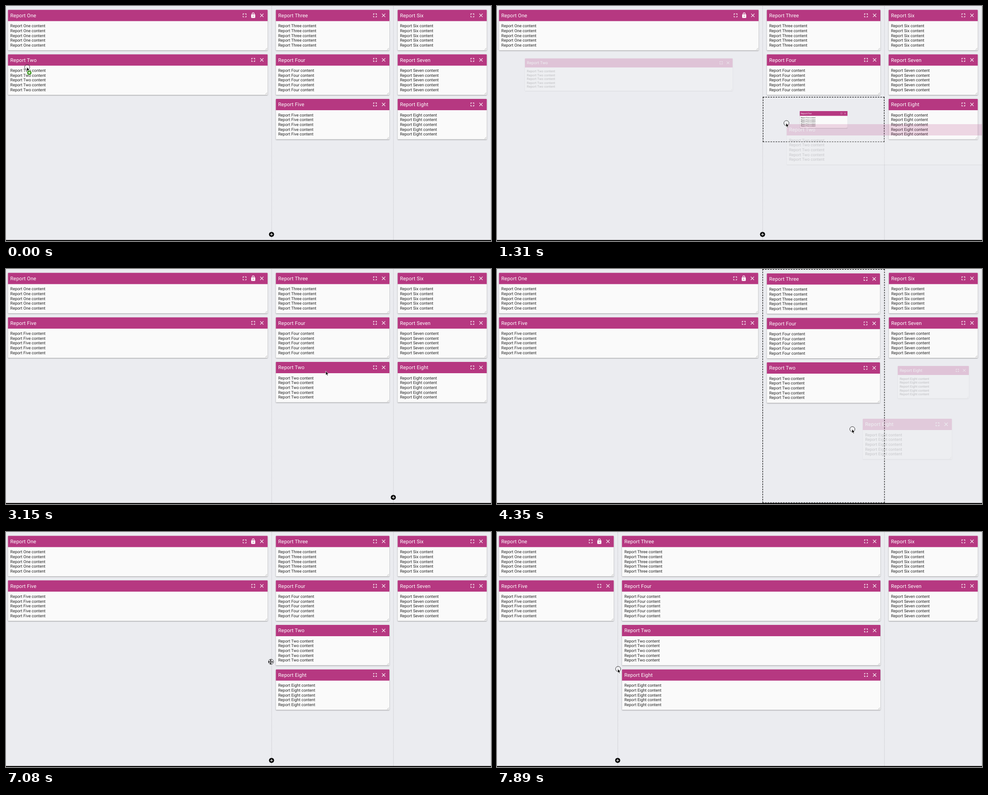
These frames come from a looping animation (1074 px wide and 521 px high, 8000 ms). An HTML page:

```html
<!DOCTYPE html>
<html lang="en">
<head>
<meta charset="utf-8">
<title>Report dashboard</title>
<style>
  html, body { margin: 0; width: 100%; height: 100%; overflow: hidden; background: #ebecf0; }
  svg { display: block; width: 1074px; height: 521px; font-family: Roboto, sans-serif; }
  text { white-space: pre; text-rendering: geometricPrecision; }
  .body { fill: #fafafa; filter: drop-shadow(0 1px 1px rgba(0, 0, 0, .36)); }
  .head { fill: #b63881; }
  .title { font-size: 11.2px; letter-spacing: .14px; fill: #fff; }
  .line { font-size: 9px; fill: #212121; }
  .icon { fill: none; stroke: #fff; stroke-width: 1.15; }
  .grip { stroke: #8a8a8a; stroke-width: .6; }
  .split { stroke: #bbbcc0; stroke-width: .8; }
  .drop { stroke: #000; stroke-width: 1.15; }
  .ring { fill: rgba(255, 255, 255, .25); stroke: #222; stroke-width: .9; }
  .arrow { stroke: #fff; stroke-width: .8; }
</style>
</head>
<body>
<svg id="stage" viewBox="0 0 1074 521"></svg>
<script>
const LOOP = 8000, TICK = 150, TOP = 8.6, CARD_H = 89.6, PITCH = 98.7;
const START = [46, 136];
const stage = document.getElementById('stage');

// Pointer moves: start time, end time, destination
const MOVES = [
  [0, 720, 455, 345], [720, 1310, 640, 260], [1310, 1570, 628, 231],
  [2850, 3150, 708, 227], [3150, 4050, 900, 213],
  [4050, 4350, 786, 355.5], [4350, 4830, 643, 355.5],
  [5900, 6640, 586, 288], [7230, 7890, 267.3, 304]
];

const within = (t, from, to) => t >= from && t < to;
const repeat = (n, draw) => Array.from({ length: n }, (_, i) => draw(i)).join('');
const spin = shape => repeat(4, i => `<g transform="rotate(${i * 90})">${shape}</g>`);

// The pointer advances in visible ticks along straight moves.
function pointerAt(t) {
  let [x, y] = START;
  for (const [from, to, toX, toY] of MOVES) {
    if (t < from) break;
    const k = t >= to ? 1 : Math.floor((t - from) / TICK) * TICK / (to - from);
    x += (toX - x) * k;
    y += (toY - y) * k;
  }
  return [x, y];
}

const ICONS = {
  close: '<path d="M-3.6-3.6L3.6 3.6M-3.6 3.6L3.6-3.6"/>',
  full: spin('<path d="M-3.4-1.1V-3.4H-1.1"/>'),
  lock: `<rect x="-4.5" y="-2.3" width="9" height="7.9" rx="1.1" fill="#fff" stroke="none"/>
    <path d="M-2.3-2V-3.4a2.3 2.3 0 0 1 4.6 0V-2"/><circle class="head" cy="1.7" r="1.1" stroke="none"/>`
};

function card(name, x, y, w, { scale = 1, alpha = 1 } = {}) {
  const icons = name === 'One' ? ['close', 'lock', 'full'] : ['close', 'full'];
  const dx = x + w * (1 - scale) / 2, dy = y + CARD_H * (1 - scale) / 2;
  return `<g transform="translate(${dx} ${dy}) scale(${scale})" opacity="${alpha}">
    <rect class="body" width="${w}" height="${CARD_H}" rx="1.2"/>
    <path class="head" d="M0 24.9V1.2Q0 0 1.2 0H${w - 1.2}Q${w} 0 ${w} 1.2V24.9z"/>
    <text class="title" x="5.2" y="16.4">Report ${name}</text>
    ${repeat(5, i => `<text class="line" x="5.2" y="${38.7 + i * 10.67}">Report ${name} content</text>`)}
    ${repeat(icons.length, i =>
      `<g class="icon" transform="translate(${w - 12.8 - i * 19.1} 12.2)">${ICONS[icons[i]]}</g>`)}
    <path class="grip" d="M${w - 5} ${CARD_H - 1}l4-4M${w - 2.5} ${CARD_H - 1}l1.5-1.5"/></g>`;
}

// Dashes are fitted so that every line begins and ends with a full one.
function dashed(kind, x1, y1, x2, y2, dash) {
  const length = Math.hypot(x2 - x1, y2 - y1);
  const count = Math.round((length + dash * 2 / 3) / (dash * 5 / 3));
  const gap = (length - count * dash) / (count - 1);
  return `<path class="${kind}" d="M${x1} ${y1}L${x2} ${y2}" stroke-dasharray="${dash} ${gap}"/>`;
}

function dropBox(x1, y1, x2, y2) {
  const side = (...ends) => dashed('drop', ...ends, 3.4), half = .56;
  return side(x1, y1 + half, x2, y1 + half) + side(x1, y2 - half, x2, y2 - half) +
    side(x1 + half, y1, x1 + half, y2) + side(x2 - half, y1, x2 - half, y2);
}

function cursor(t, x, y) {
  const pressed = t < 2590 || within(t, 4050, 5130) || t >= 7080;
  let shape = '<path class="arrow" d="M0-.6V8.4L2 6.6 3.5 9.8 5 9.1 3.6 6H6.3z"/>';
  if (within(t, 5280, 6050))
    shape = '<path d="M-2.5-4.5Q0-4.5 0-3Q0-4.5 2.5-4.5M0-3V3M-2.5 4.5Q0 4.5 0 3Q0 4.5 2.5 4.5M-1 1H1" fill="none" stroke="#222"/>';
  else if (within(t, 6500, 7230))
    shape = spin('<path d="M-.6 0V-2.9H-2L0-5.4 2-2.9H.6V0z"/>');
  const ring = pressed ? '<circle class="ring" cx=".9" cy="-.4" r="5.7"/>' : '';
  const copy = t < TICK ? `<circle cx="5.6" cy="12" r="5" fill="#3c9a1e" stroke="#dfe8dc" stroke-width=".6"/>
    <path d="M3 12H8.2M5.6 9.4V14.6" stroke="#fff" stroke-width="1.4"/>` : '';
  return `<g transform="translate(${x} ${y})">${ring}${shape}${copy}</g>`;
}

const plus = x => `<g transform="translate(${x - .3} 506.3)"><circle r="5.6"/>
  <path d="M-3 0H3M0-3V3" stroke="#fff" stroke-width="1.2"/></g>`;

function layout(t) {
  const cols = [['One', 'Two'], ['Three', 'Four', 'Five'], ['Six', 'Seven', 'Eight']];
  if (t >= 2140) [cols[0][1], cols[1][2]] = ['Five', 'Two'];
  if (t >= 5580) cols[1].push(cols[2].pop());
  return cols;
}

function render(t) {
  const [px, py] = pointerAt(t);
  const split = t < 7230 + TICK ? 588.3 : px + .2;
  const edges = [0, split, 858, 1073.6];
  const dragged = within(t, 150, 2140) ? 'Two' : within(t, 4200, 5280) ? 'Eight' : '';
  const hover = within(t, 450, 1010) ? 0 : within(t, 1010, 1160) || within(t, 4350, 5280) ? 1 : -1;
  const swapping = within(t, 1160, 2140);
  let out = '';

  layout(t).forEach((names, c) => {
    const start = edges[c], end = edges[c + 1], hot = c === hover;
    const left = (c ? start + 9.3 : 4.4) + (hover >= 0 && c === hover + 1 ? .5 : 0);
    const right = end - 9 - (hot || c === hover - 1 ? 1 : 0);
    out += hot ? dropBox(start - .4, 0, end + .6, 518.6) : dashed('split', end, 0, end, 519, 1.7);
    names.forEach((name, i) => {
      let y = TOP + i * PITCH + (hot ? 1.1 : 0), look;
      if (name === dragged) look = { scale: .8, alpha: .22 };
      if (swapping && name === 'Five') {
        out += dropBox(start + .4, y - 4.4, end, y + 95.6);
        look = { scale: .42 };
        y += 1.1;
      }
      out += card(name, left, y, right - left, look);
    });
  });

  if (t < 2140 || t >= 6350) out += plus(split);
  else if (within(t, 3150, 4200) || within(t, 5280, 6350)) out += plus(858);
  out += '<rect y="518.8" width="1074" height="2.2"/>';

  if (within(t, 150, 1840)) out += card('Two', px + 1.5, py + 2, 575, { alpha: .18 });
  if (within(t, 4200, 4980)) out += card('Eight', px + 24, py - 23.5, 197.3, { alpha: .18 });
  return out + cursor(t, px, py);
}

let shown;
function frame(now) {
  const html = render(now % LOOP);
  if (html !== shown) stage.innerHTML = shown = html;
  requestAnimationFrame(frame);
}
frame(performance.now());
</script>
</body>
</html>
```
